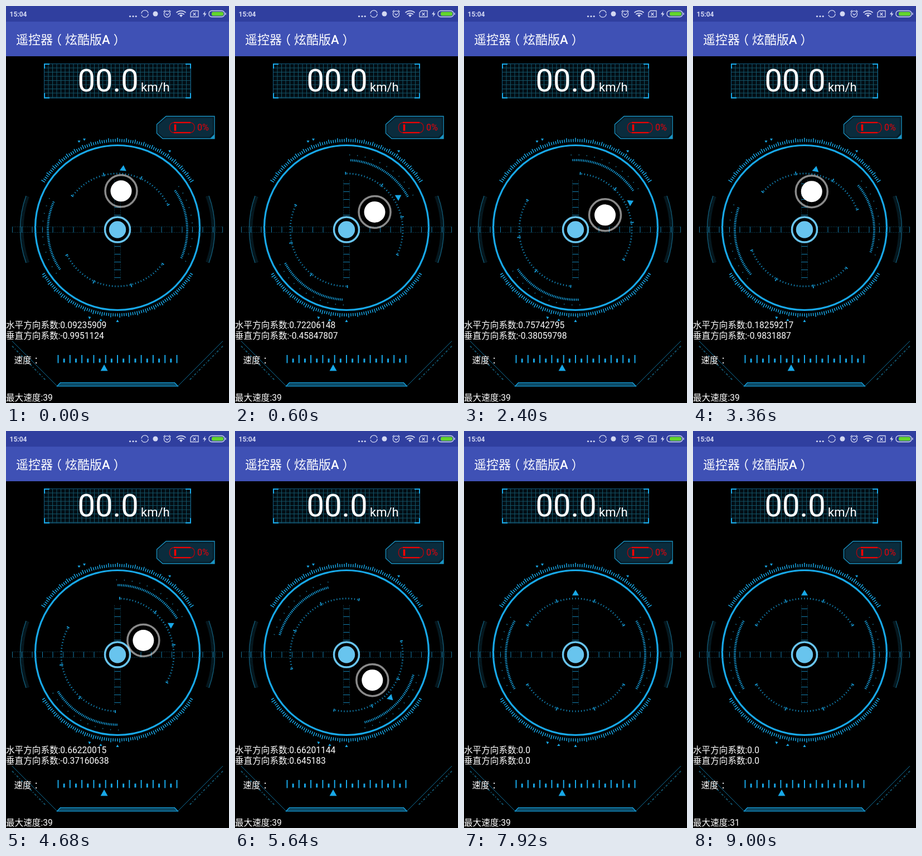
Animation of 400 by 711 pixels, one loop 9.12 s. Source, as an HTML page:

```html
<!DOCTYPE html>
<html lang="zh">
<head>
<meta charset="utf-8">
<title>遥控器</title>
<style>
html, body { margin: 0; width: 100%; height: 100%; overflow: hidden; background: #000; }
svg { display: block; width: 100%; height: 100%; }
text { font-family: Roboto, 'Noto Sans CJK SC', 'Noto Sans CJK', sans-serif; fill: #fff; white-space: pre; }
.label { font-size: 15.6px; }
.line { fill: none; stroke: #18a8e8; }
.dim { fill: none; stroke: #176f91; }
.solid { fill: #18a8e8; }
.icon { fill: none; stroke: #d3d8f2; stroke-width: 1.3; }
.iconfill { fill: #d3d8f2; }
</style>
</head>
<body>
<svg id="stage" viewBox="0 0 400 711">
  <defs>
    <pattern id="grid" x="68" y="103" width="7.5" height="7.5" patternUnits="userSpaceOnUse">
      <path d="M.5 0V7.5M0 .5H7.5" fill="none" stroke="#135468"/>
    </pattern>
  </defs>
  <rect width="400" height="711"/>

  <!-- status bar and title -->
  <rect width="400" height="28.5" fill="#303f9f"/>
  <rect y="28" width="400" height="62" fill="#3f51b5"/>
  <text x="6.5" y="18.8" font-size="12" font-weight="700" style="fill:#d3d8f2">15:04</text>
  <g class="iconfill">
    <circle cx="222.5" cy="18.5" r="1.6"/><circle cx="228" cy="18.5" r="1.6"/><circle cx="233.2" cy="18.5" r="1.6"/>
    <circle cx="268" cy="14" r="4.5"/>
    <path d="M314 20l-3-3.4a4.4 4.4 0 0 1 6 0z"/>
    <path d="M357.500 9l-4.500 6h3l-1 4.500 4.500-6h-3z"/>
  </g>
  <g class="icon">
    <circle cx="249" cy="14" r="6.200" stroke-dasharray="17 2.500"/>
    <circle cx="289" cy="14.500" r="5.600"/><path d="M286.500 13.500l2.500 2.500 3-2.500M282.500 10.500l3-3M295.500 10.500l-3-3"/>
    <path d="M305.500 12a12.500 12.500 0 0 1 17 0M308.300 15a8.500 8.500 0 0 1 11.400 0" stroke-width="1.700"/>
    <path d="M334.500 8.500H345V19.500H331V12zM335.500 12l5 5M340.500 12l-5 5"/>
    <rect x="364" y="8.500" width="28" height="11" rx="5"/><path d="M394 12v4"/>
  </g>
  <rect x="369" y="10.500" width="21" height="7" rx="2.500" fill="#63d62b"/>
  <text x="18" y="67.500" font-size="22" font-weight="500">遥控器<tspan dx="-6">（</tspan><tspan dx="6">炫酷版A</tspan><tspan dx="6">）</tspan></text>

  <!-- speed readout -->
  <rect x="68.500" y="103.500" width="263" height="61.500" fill="#020d14"/>
  <rect x="68.500" y="103.500" width="263" height="61.500" fill="url(#grid)" stroke="#11587c"/>
  <path class="line" stroke-width="2" d="M69 112V104H78M322 104H331V112M331 156V164.500H322M78 164.500H69V156"/>
  <text x="128.500" y="153" font-size="56">00.0</text>
  <text x="242" y="153" font-size="22">km/h</text>

  <!-- battery -->
  <path d="M270.500 212L287 197.500H374V237.500H281L270.500 228Z" fill="#061a26" stroke="#1a94c4" stroke-width="1.300"/>
  <path d="M273.500 213L288 200.500H371V228L365 234.500H282L273.500 227Z" fill="#0a2c3d"/>
  <path d="M374 229.500V237.500H366Z" fill="#1a94c4"/>
  <rect x="293.500" y="208.500" width="44.500" height="18.500" rx="8" fill="none" stroke="#a50710" stroke-width="1.500"/>
  <path d="M301 208.800H331M301 226.800H331" fill="none" stroke="#f00" stroke-width="2"/>
  <path d="M303.500 212V223.500" stroke="#f00" stroke-width="3.500"/>
  <text x="343" y="223" font-size="16" style="fill:#f00008">0%</text>

  <!-- dial -->
  <circle class="line" cx="200" cy="397" r="147.500" stroke-width="3.200"/>
  <path id="rimTicks" class="line" stroke-width="1.500"/>
  <path id="sideTicks" class="dim" stroke-width=".9" opacity=".55"/>
  <path class="dim" d="M36 340A175 175 0 0 0 36 460M364 340A175 175 0 0 1 364 460" stroke-width="1.300" opacity=".85"/>
  <path class="solid" d="M128.500 241h5l-2.500 4zM138 237.500h5l-2.500 4zM291 258.500h5l-2 4zM147.500 556l5 1-3 4zM167 564l3-4 2.500 4zM197.500 566l2.500-4.500 2.500 4.500z"/>
  <g class="dim">
    <path d="M11 395.500H389M11 405.500H389M194.500 312V490M205.500 312V490" stroke-dasharray="1 2" opacity=".85"/>
    <path d="M11.500 395V406M388.500 395V406"/>
  </g>
  <path id="crossTicks" class="line" stroke-width="1" opacity=".75"/>
  <g id="fineRing">
    <path id="fineTicks" class="line" stroke-width="1.100"/>
    <path id="fineMarks" class="line" stroke-width="1.700"/>
    <path class="solid" d="M200 284.500L206 294.500H194Z"/>
  </g>
  <g id="denseRing">
    <path id="denseTicks" class="line" stroke-width="1.400"/>
    <path id="sparseTicks" class="dim" stroke-width="1.300"/>
  </g>
  <circle cx="200" cy="400.500" r="22.500" stroke="#68c4ee" stroke-width="3.500"/>
  <circle cx="200" cy="400.500" r="15.200" fill="#68c4ee"/>
  <g id="handle">
    <circle r="28.500" fill="none" stroke="#fff" stroke-opacity=".54" stroke-width="3.500"/>
    <circle r="19" fill="#fff"/>
  </g>

  <!-- lower panel -->
  <g id="wing">
    <path class="line" d="M11 600L92 681" stroke-width="1" opacity=".65"/>
    <path class="dim" d="M11 609L72 671" stroke-width="2" stroke-dasharray="4 3 1.500 3" opacity=".75"/>
  </g>
  <use href="#wing" transform="matrix(-1 0 0 1 400 0)"/>
  <path d="M97.500 674.500H302.500L308.500 681H91.500Z" fill="#0b4a66" stroke="#18a8e8" stroke-width="1.200"/>
  <path id="scaleLong" class="line" stroke-width="2"/>
  <path id="scaleShort" class="line" stroke-width="3"/>
  <path id="pointer" class="solid" d="M0 642L6.500 653.500H-6.500Z"/>
  <text class="label" id="horizontal" x="0" y="577"></text>
  <text class="label" id="vertical" x="0" y="595.500"></text>
  <text class="label" x="14.500" y="640">速度<tspan dx="4.500">：</tspan></text>
  <text class="label" id="maxSpeed" x="0" y="706.500"></text>
</svg>
<script>
const LOOP = 9120, STEP = 120, RELEASE = 7680, TRAVEL = 70;
const CENTER = { x: 200, y: 401 };
const get = id => document.getElementById(id);
const setPath = (id, d) => get(id).setAttribute('d', d);
const move = (id, value) => get(id).setAttribute('transform', value);
const range = (from, to, step) =>
  Array.from({ length: Math.floor((to - from) / step + 1e-6) + 1 }, (_, i) => from + i * step);

// Radial strokes; angles run clockwise from the top.
function radial(angles, inner, outer, cy = CENTER.y) {
  return angles.map((angle, i) => {
    const a = angle * Math.PI / 180, s = Math.sin(a), c = -Math.cos(a);
    const end = typeof outer === 'function' ? outer(i) : outer;
    const point = r => (CENTER.x + r * s).toFixed(2) + ' ' + (cy + r * c).toFixed(2);
    return `M${point(inner)}L${point(end)}`;
  }).join('');
}
const bothSides = (angles, first) => [first, first + 180].flatMap(base => angles.map(a => a + base));

setPath('rimTicks', radial(bothSides(range(-58, 58, 1.45), 0), 153.5, i => i % 4 ? 159 : 161, 397));
setPath('sideTicks', radial(bothSides(range(-20, 20, .75), 90), 168.5, 174, 400));
setPath('fineTicks', radial(bothSides(range(-57, 57, 3), 0), 99.5, 102.5));
setPath('fineMarks', radial(bothSides([-19.3, 19.3], 0), 99, 105.5) +
  radial(bothSides([-58.5, 58.5], 0), 99, 104));
setPath('denseTicks', radial(bothSides(range(-28.8, 28.8, 1.44), 90), 123, 127));
setPath('sparseTicks', radial(bothSides(range(-30, 30, 6), 90), 133.5, 135.5));

const across = range(0, 148, 18.5).flatMap(d => [176.5 - d, 223.5 + d]);
const along = range(0, 56, 14).flatMap(d => [374 - d, 430 + d]);
setPath('crossTicks', across.map(x => `M${x} 395.5V405.5`).join('') +
  along.map(y => `M194.5 ${y + .5}H205.5`).join(''));

const scale = range(0, 20, 1);
const scaleTick = (i, top, bottom) => `M${93.5 + i * 10.65} ${top}V${bottom}`;
setPath('scaleLong', scale.filter(i => i % 2 === 0).map(i => scaleTick(i, 625, 639.5)).join(''));
setPath('scaleShort', scale.filter(i => i % 2).map(i => scaleTick(i, 631.5, 638.5)).join(''));

// Stick deflection: time, horizontal, vertical.
const stick = [
  [0, 0.09235909, -0.9951124],
  [1320, 0.5364794, 0.39448413],
  [3360, 0.18259217, -0.9831887],
  [4680, 0.66220015, -0.37160638],
  [5640, 0.66201144, 0.645183],
  [6960, 0.8328224, -0.20893382],
  [RELEASE, 0.8328224, -0.20893382]
].map(([time, h, v]) => ({ time, angle: Math.atan2(h, -v), reach: Math.hypot(h, v) }));

const clamp = x => Math.min(1, Math.max(0, x));
const ease = x => x * x * (3 - 2 * x);
const mix = (a, b, k) => a + (b - a) * k;

function stickAt(time) {
  if (time >= RELEASE) return { angle: 0, reach: 0 };
  const next = stick.findIndex(key => key.time > time);
  const a = stick[next - 1], b = stick[next];
  const k = ease((time - a.time) / (b.time - a.time));
  return { angle: mix(a.angle, b.angle, k), reach: mix(a.reach, b.reach, k) };
}

const format = x => x === 0 ? '0.0' : String(+x.toFixed(8));

function draw(now) {
  const time = Math.floor(now % LOOP / STEP) * STEP;
  const { angle, reach } = stickAt(time);
  const h = reach ? reach * Math.sin(angle) : 0;
  const v = reach ? -reach * Math.cos(angle) : 0;
  const degrees = angle * 180 / Math.PI;
  const speed = Math.round(mix(39, 31, clamp((time - 8040) / 720)));

  move('fineRing', `rotate(${degrees} ${CENTER.x} ${CENTER.y})`);
  move('denseRing', `rotate(${-degrees} ${CENTER.x} ${CENTER.y})`);
  move('handle', `translate(${CENTER.x + TRAVEL * h} ${CENTER.y + TRAVEL * v})`);
  get('handle').style.display = reach ? '' : 'none';
  move('pointer', `translate(${93 + speed * 2.13} 0)`);
  get('horizontal').textContent = '水平方向系数:' + format(h);
  get('vertical').textContent = '垂直方向系数:' + format(v);
  get('maxSpeed').textContent = '最大速度:' + speed;
}

const start = performance.now();
function tick() {
  draw(performance.now() - start);
  requestAnimationFrame(tick);
}
tick();
</script>
</body>
</html>
```
